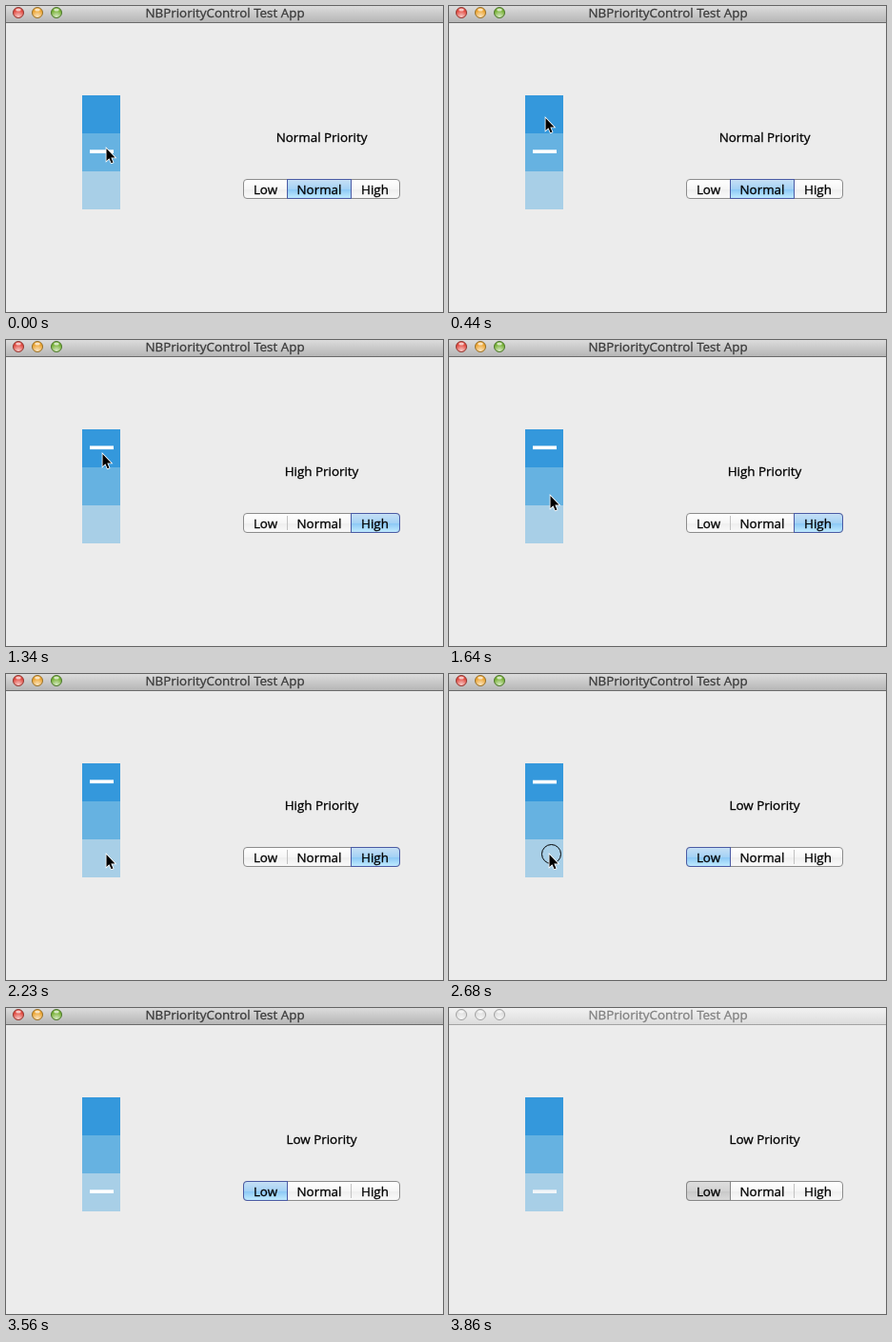
Animation, 459 px wide and 322 px high, one loop 3960 ms. Source, as an HTML page:

```html
<!DOCTYPE html>
<html lang="en">
<head>
<meta charset="utf-8">
<title>Priority control</title>
<style>
  html, body { margin: 0; width: 100%; height: 100%; overflow: hidden; background: #ececec; }
  svg { display: block; --line: #4a5aa4; }
  .inactive { --line: #858585; }
  text { font: 13.4px "Open Sans", "Noto Sans", sans-serif; text-anchor: middle; stroke: #000; stroke-width: .3; }
  #title { fill: #3a3a3a; stroke: #3a3a3a; }
  .inactive #title { fill: #808080; stroke: #808080; }
  #bar { fill: url(#barOn); }
  .inactive #bar { fill: url(#barOff); }
  #edge { fill: #6a6a6a; }
  .inactive #edge { fill: #a2a2a2; }
  .inactive .light { fill: #dedede; stroke: #a0a0a0; }
  #chosen { fill: url(#blue); stroke: var(--line); }
  .inactive #chosen { fill: url(#grey); }
  #sides { fill: none; stroke: var(--line); }
  .inactive #dash { fill: #f1f5f8; }
</style>
</head>
<body>
<svg id="stage" width="459" height="322" viewBox="0 0 459 322">
  <defs>
    <linearGradient id="barOn" x2="0" y2="1"><stop stop-color="#dcdcdc"/><stop offset="1" stop-color="#b6b6b6"/></linearGradient>
    <linearGradient id="barOff" x2="0" y2="1"><stop stop-color="#f2f2f2"/><stop offset="1" stop-color="#dcdcdc"/></linearGradient>
    <linearGradient id="plain" x2="0" y2="1"><stop stop-color="#fff"/><stop offset=".5" stop-color="#f6f6f6"/><stop offset=".52" stop-color="#eee"/><stop offset="1" stop-color="#fafafa"/></linearGradient>
    <linearGradient id="blue" x2="0" y2="1"><stop stop-color="#c8e0f5"/><stop offset=".5" stop-color="#a4d2f5"/><stop offset=".52" stop-color="#8ac7f5"/><stop offset="1" stop-color="#c2ecff"/></linearGradient>
    <linearGradient id="grey" x2="0" y2="1"><stop stop-color="#dedede"/><stop offset=".5" stop-color="#d2d2d2"/><stop offset=".52" stop-color="#c8c8c8"/><stop offset="1" stop-color="#dadada"/></linearGradient>
    <radialGradient id="glow" cy=".95" r=".75"><stop stop-color="#fff" stop-opacity=".75"/><stop offset="1" stop-color="#fff" stop-opacity="0"/></radialGradient>
    <clipPath id="slot"><rect id="slotBox" y="181" height="23"/></clipPath>
  </defs>

  <rect width="459" height="322" fill="#ececec"/>
  <rect id="bar" width="459" height="17"/>
  <rect id="edge" y="17" width="459" height="1"/>
  <g id="lights"></g>
  <text id="title" x="230" y="12">NBPriorityControl Test App</text>

  <g shape-rendering="crispEdges">
    <rect x="80" y="94" width="40" height="40" fill="#3498dc"/>
    <rect x="80" y="134" width="40" height="40" fill="#66b2e1"/>
    <rect x="80" y="174" width="40" height="40" fill="#a8cfe7"/>
  </g>
  <rect id="dash" x="88" width="25" height="3.7" fill="#fff"/>

  <text id="label" x="331.5" y="143"></text>

  <rect x="249.5" y="182.5" width="164" height="20" rx="3.5" fill="url(#plain)" stroke="#8c8c8c"/>
  <path d="M295.5 185v15M362.5 185v15" stroke="#c2c2c2"/>
  <g clip-path="url(#slot)">
    <rect id="chosen" x="249.5" y="182.5" width="164" height="20" rx="3.5"/>
    <path id="sides" d="M295.5 182v21M362.5 182v21"/>
  </g>
  <text x="272.5" y="198">Low</text>
  <text x="329" y="198">Normal</text>
  <text x="387.5" y="198">High</text>

  <circle id="ring" r="10" fill="none" stroke="#000"/>
  <path id="cursor" d="M1.5 1v13l2.9-2.7 2.2 5 1.9-.8-2.2-5h4.2z" stroke="#fff" stroke-width="1.6" paint-order="stroke"/>
</svg>
<script>
const LOOP = 3960, TICK = 148.5;
const $ = id => document.getElementById(id);
const set = (id, attrs) => Object.entries(attrs).forEach(([k, v]) => $(id).setAttribute(k, v));

const linear = u => u;
const easeOut = u => 1 - (1 - u) ** 1.5;
const smooth = u => u * u * (3 - 2 * u);

// Runs a point through its legs; times are in ticks, bow bends a leg vertically.
function travel(start, legs, tick) {
  return legs.reduce(([x, y], { from, to, goal, ease, bow = 0 }) => {
    const e = ease(Math.min(1, Math.max(0, (tick - from) / (to - from))));
    return [x + (goal[0] - x) * e, y + (goal[1] - y) * e + bow * e * (1 - e)];
  }, start);
}

const pointerLegs = [
  { from: 0, to: 2, goal: [100, 117], ease: easeOut },
  { from: 8.9, to: 12, goal: [107, 185], ease: linear },
  { from: 12, to: 15, goal: [104, 189], ease: easeOut },
  { from: 20, to: 22.2, goal: [419, 299], ease: smooth, bow: -60 }
];
const dashLegs = [
  { from: 5.4, to: 7.2, goal: [88, 111.4], ease: smooth },
  { from: 17.95, to: 19.3, goal: [88, 191.3], ease: smooth }
];
const segments = { Low: [249, 296], Normal: [295, 363], High: [362, 414] };

$("lights").innerHTML = [["#e2463c", "#8f3a34"], ["#eda32c", "#94702c"], ["#74b030", "#4d7530"]]
  .map(([fill, line], i) => `<g transform="translate(${13 + 20 * i} 7)">
    <circle class="light" r="5.5" fill="${fill}" stroke="${line}"/>
    <circle r="5" fill="url(#glow)"/>
    <ellipse cy="-3" rx="2.8" ry="1.5" fill="#fff" opacity=".7"/></g>`).join("");

function draw() {
  const t = performance.now() % LOOP;
  const tick = Math.floor((t + 8) / TICK);
  const [x, y] = travel([104, 149], pointerLegs, tick).map(Math.round);
  const name = tick < 6 ? "Normal" : tick < 18 ? "High" : "Low";
  const [left, right] = segments[name];
  const pressed = tick === 5 || tick === 18;

  $("stage").classList.toggle("inactive", tick >= 26);
  set("cursor", { transform: `translate(${x} ${y})`, visibility: tick < 24 ? "visible" : "hidden" });
  set("ring", { cx: x + 3.5, cy: y + .5, visibility: pressed ? "visible" : "hidden" });
  set("dash", { y: travel([88, 151.3], dashLegs, tick)[1] });
  set("slotBox", { x: left, width: right - left });
  $("label").textContent = name + " Priority";
  requestAnimationFrame(draw);
}
draw();
</script>
</body>
</html>
```
